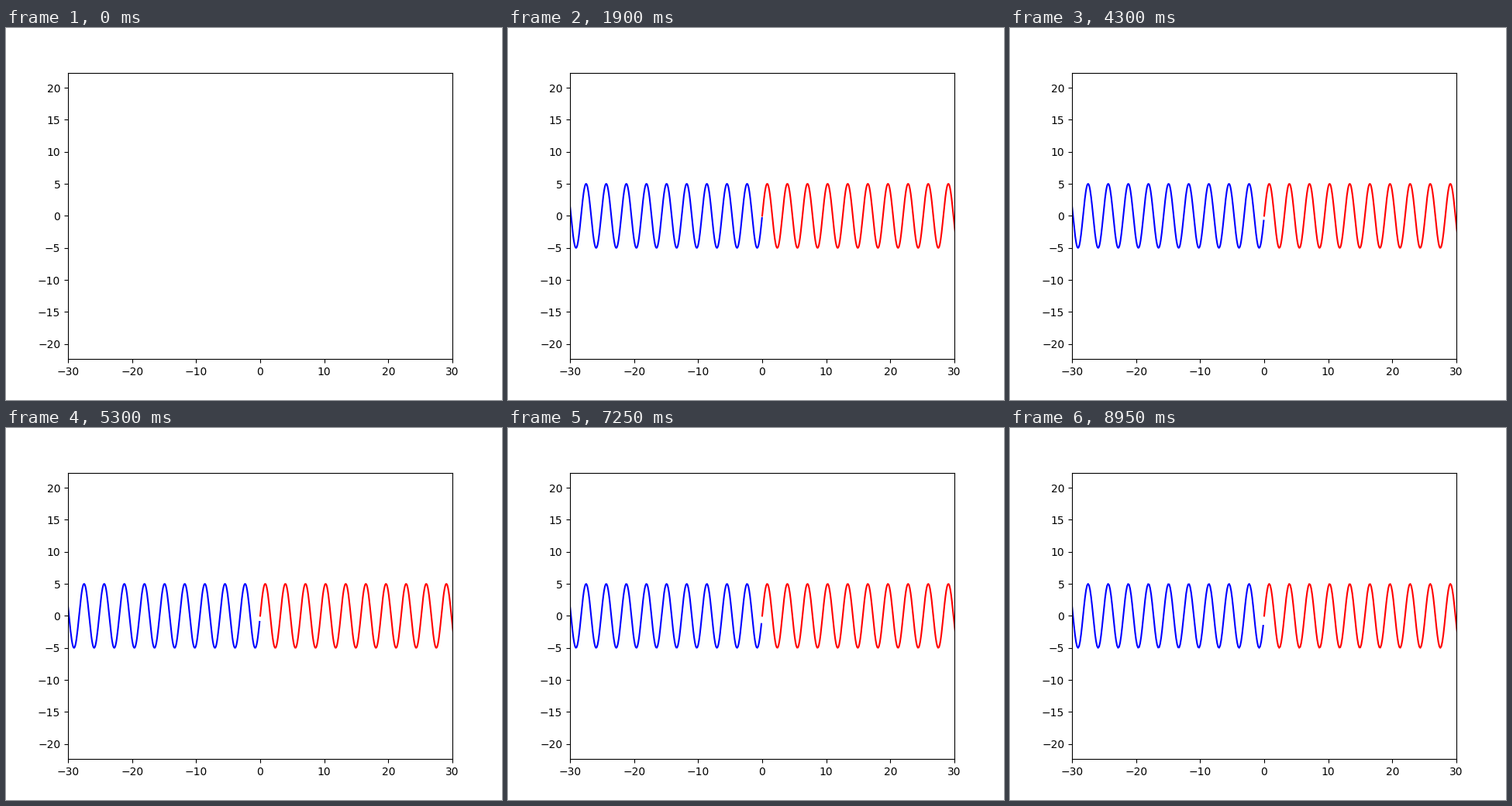
A matplotlib script for the animation above (9000 ms loop, 640 by 480 pixels).

```python
import numpy as np
import matplotlib.pyplot as plt
from matplotlib.animation import FuncAnimation

FRAMES = 180
INTERVAL = 50       # ms
SAMPLES = 1000      # points per half of the wave
STEP = 0.05         # degrees added to the sample spacing each frame
AMPLITUDE = 5

fig, ax = plt.subplots(figsize=(6.4, 4.8), dpi=100)
half_height = 30 * (0.77 * 480) / (0.775 * 640)   # equal scale on both axes
ax.set_xlim(-30, 30)
ax.set_ylim(-half_height, half_height)

left, = ax.plot([], [], "b-", lw=1.5)
right, = ax.plot([], [], "r-", lw=1.5)


def set_wave(line, x):
    line.set_data(x, AMPLITUDE * np.sin(2 * x))


def update(frame):
    if frame == 0:
        left.set_data([], [])
        right.set_data([], [])
    else:
        spacing = np.radians(STEP * frame)
        set_wave(left, spacing * np.arange(-SAMPLES, 0))
        set_wave(right, spacing * np.arange(SAMPLES))
    return left, right


anim = FuncAnimation(fig, update, frames=FRAMES, init_func=lambda: update(0),
                     interval=INTERVAL, repeat=True, repeat_delay=0)
plt.show()
```
